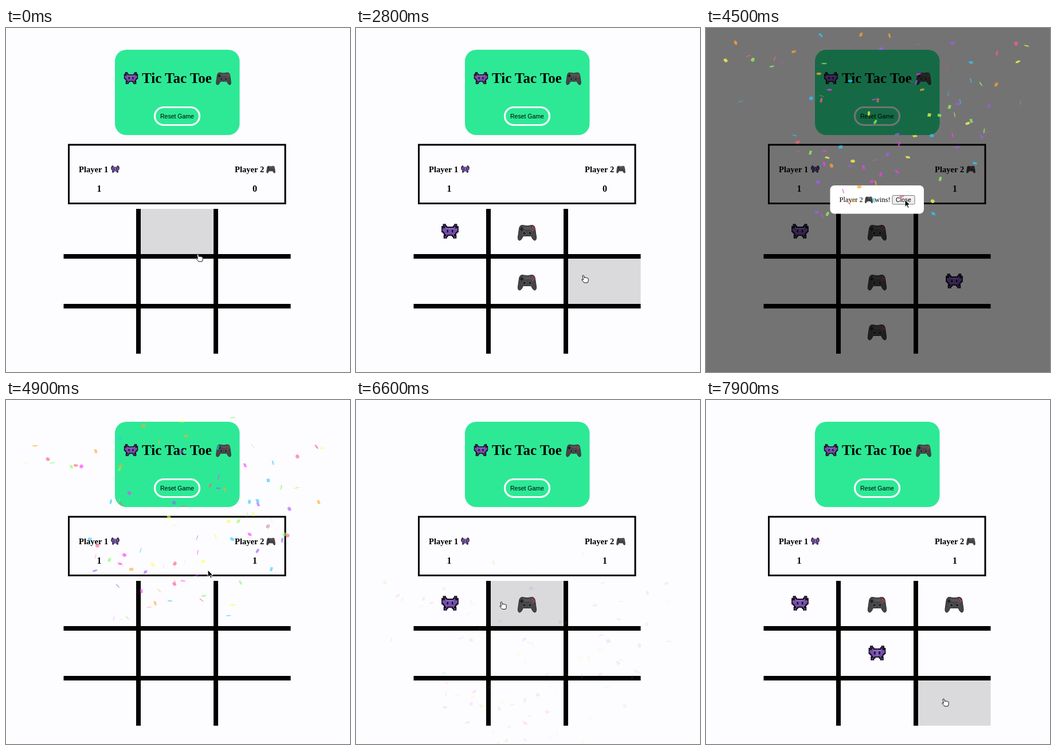
An HTML page with a canvas for the animation above (8000 ms loop, 600x601 px).

```html
<!DOCTYPE html>
<html lang="en">
<head>
<meta charset="utf-8">
<title>Tic Tac Toe</title>
<style>
  html, body { margin: 0; width: 600px; height: 601px; overflow: hidden; background: #fdfcfe; }
  svg, canvas { position: absolute; left: 0; top: 0; }
  .serif { font-family: "Liberation Serif", "Times New Roman", serif; }
  .bold { font-weight: bold; }
  .sans { font-family: "Liberation Sans", Arial, sans-serif; font-size: 10.5px; text-anchor: middle; }
</style>
</head>
<body>
<svg width="600" height="601">
  <defs>
    <g id="half">
      <path d="M0 3H3V2H4V.6H5.8V2H5V3.5H6V2.5H7V7H6V8H5V9.5H4V10.5H5.2V12.4H3V11H2V10H0" fill="#7650ad" stroke="#17101f" stroke-width=".9"/>
      <path d="M0 4H3.5V5H0Z" fill="#8c66c4"/>
      <path d="M1.5 5.2H2.7V7.6H1.5Z" fill="#140d1c"/>
    </g>
    <g id="alien" transform="scale(2) translate(0 -6.5)">
      <use href="#half"/><use href="#half" transform="scale(-1 1)"/>
    </g>
    <g id="pad">
      <path d="M-8-12.5Q-13-13-14-6L-16 8Q-16.500 14.500-12.500 14Q-9.500 13-7 6.500H7Q9.500 13 12.500 14Q16.500 14.500 16 8L14-6Q13-13 8-12.500Q0-10-8-12.500Z" fill="#454446" stroke="#2c2b2d"/>
      <path d="M-7-10.500Q0-8 7-10.500L5-5H-5Z" fill="#565558"/>
      <g fill="#252426" stroke="#777679" stroke-width=".8">
        <circle cx="-5" cy="1.500" r="3"/><circle cx="5" cy="1.500" r="3"/>
      </g>
      <path d="M-9.500-8.500V-2.500M-12.500-5.500H-6.500" stroke="#1d1c1e" stroke-width="2"/>
      <g fill="#d0424b">
        <circle cx="9.500" cy="-8.500" r="1.400"/><circle cx="12" cy="-5.800" r="1.400"/>
        <circle cx="7" cy="-5.800" r="1.200" fill="#8b5560"/><circle cx="9.500" cy="-3.200" r="1.200" fill="#a85555"/>
      </g>
    </g>
  </defs>

  <rect width="600" height="601" fill="#fdfcfe"/>
  <rect x="190" y="38" width="217.500" height="149" rx="20" fill="#2de996"/>
  <use href="#alien" transform="translate(218 87.500) scale(.82)"/>
  <text class="serif bold" x="237" y="96" font-size="25">Tic Tac Toe</text>
  <use href="#pad" transform="translate(379.500 88) scale(.8)"/>
  <rect x="259.500" y="138.500" width="78" height="31" rx="15.500" fill="none" stroke="#fdfcfe" stroke-width="3.200"/>
  <text class="sans" x="298.500" y="157.500">Reset Game</text>

  <rect x="109.500" y="204" width="377.500" height="102.500" fill="none" stroke="#000" stroke-width="3"/>
  <g class="serif bold" font-size="14.600">
    <text x="127" y="251.500">Player 1</text>
    <text x="399" y="251.500">Player 2</text>
  </g>
  <use href="#alien" transform="translate(190.500 246.500) scale(.48)"/>
  <use href="#pad" transform="translate(462 247) scale(.47)"/>
  <g class="serif bold" font-size="16" text-anchor="middle">
    <text x="162.500" y="285.500">1</text>
    <text id="score" x="434" y="285.500">0</text>
  </g>

  <rect id="hover" width="127" height="79" fill="#dad9db"/>
  <path d="M231 316V569M366 316V569M100.500 399H496.500M100.500 486H496.500" stroke="#000" stroke-width="8"/>
  <g id="marks"></g>

  <g id="modal">
    <rect width="600" height="601" fill="#000" fill-opacity=".54"/>
    <rect x="216.500" y="275" width="163.500" height="49.500" rx="7.500" fill="#fff"/>
    <g class="serif" font-size="12.500">
      <text x="232.500" y="304">Player 2</text><text x="294" y="304">wins!</text>
    </g>
    <use href="#pad" transform="translate(284 300) scale(.42)"/>
    <rect x="325" y="292.500" width="39" height="15.500" rx="2" fill="#efefef" stroke="#767676"/>
    <text class="sans" x="344.500" y="304">Close</text>
  </g>
</svg>
<canvas id="confetti" width="600" height="601"></canvas>
<svg width="600" height="601">
  <g id="cursor" stroke-linejoin="round">
    <path id="hand" d="M-1 1Q0-1 1.500 .8L2.500 5L3 4Q4.500 3.300 5 4.500Q6.500 3.600 7.200 5Q9 4.400 9.200 6.500Q9.800 10 8 13H2L-1.500 9Q-3 7-1.500 6.800L.5 8Z" fill="#fff" stroke="#111"/>
    <path id="arrow" d="M0 0V12.500L3 9.800L5 14.500L7 13.600L5 9H9Z" fill="#000" stroke="#fff"/>
  </g>
</svg>
<script>
const LOOP = 8000, STEP = 100, WIN = 3600, CLOSE = 4700, BURST = 3633;
const $ = id => document.getElementById(id);
const show = (el, on) => el.setAttribute('visibility', on ? 'visible' : 'hidden');

// time, x, y of the pointer tip
const path = [
  [0, 334, 395], [500, 300, 440], [1000, 301, 442], [1400, 198, 373], [1600, 198, 373],
  [2100, 292, 362], [2400, 294, 363], [2800, 396, 432], [3000, 428, 441], [3200, 424, 444],
  [3500, 294, 511], [4000, 294, 511], [4500, 347, 300], [4900, 352, 297], [5200, 340, 306],
  [5700, 172, 350], [6200, 176, 352], [6500, 252, 352], [6700, 254, 353], [7100, 300, 432],
  [7200, 302, 432], [7500, 410, 366], [7700, 414, 376], [7900, 414, 522], [8000, 414, 522]
];

// mark, cell, time placed, time cleared
const moves = [
  ['pad', 4, 700, CLOSE], ['alien', 0, 1400, CLOSE], ['pad', 1, 2100, CLOSE],
  ['alien', 5, 3000, CLOSE], ['pad', 7, WIN, CLOSE],
  ['alien', 0, 5800, LOOP], ['pad', 1, 6500, LOOP], ['alien', 4, 7100, LOOP], ['pad', 2, 7500, LOOP]
].map(([kind, cell, from, to]) => {
  const el = document.createElementNS('http://www.w3.org/2000/svg', 'use');
  const x = 164 + cell % 3 * 134.5, y = (kind === 'pad' ? 357 : 355) + Math.floor(cell / 3) * 87;
  el.setAttribute('href', '#' + kind);
  el.setAttribute('transform', `translate(${x} ${y})`);
  $('marks').append(el);
  return { el, from, to };
});

function pointer(t) {
  const i = path.findIndex(p => p[0] > t);
  const [t0, x0, y0] = path[i - 1], [t1, x1, y1] = path[i];
  const k = (1 - Math.cos(Math.PI * (t - t0) / (t1 - t0))) / 2;
  return [x0 + (x1 - x0) * k, y0 + (y1 - y0) * k];
}

function cellAt(x, y) {
  const col = Math.floor((x - 100.5) / 134.5), row = Math.floor((y - 316) / 87);
  const left = 100.5 + col * 134.5, top = 316 + row * 87;
  const inside = col >= 0 && col < 3 && row >= 0 && row < 3 && x - left <= 127 && y - top <= 79;
  return inside ? [left, top] : null;
}

let seed = 20;
function random() {
  seed = (seed + 0x6D2B79F5) | 0;
  let r = Math.imul(seed ^ seed >>> 15, 1 | seed);
  r = r + Math.imul(r ^ r >>> 7, 61 | r) ^ r;
  return ((r ^ r >>> 14) >>> 0) / 4294967296;
}

const colors = ['#26ccff', '#a25afd', '#ff5e7e', '#88ff5a', '#fcff42', '#ffa62d', '#ff36ff'];
const bits = Array.from({ length: 100 }, (_, i) => ({
  color: colors[i % 7],
  angle: (random() - .5) * 70 * Math.PI / 180 - Math.PI / 2,
  speed: 45 * (.5 + random()),
  wobble: random() * 10,
  spin: Math.min(.11, random() * .1 + .05),
  tilt: (random() * .5 + .25) * Math.PI,
  round: random() < .5
}));

const ctx = $('confetti').getContext('2d');
function drawConfetti(t) {
  ctx.setTransform(1, 0, 0, 1, 0, 0);
  ctx.clearRect(0, 0, 600, 601);
  const n = (t - BURST) * .06;
  if (n < 0 || n >= 200) return;
  ctx.setTransform(.78, 0, 0, .78, 300, 361);
  ctx.globalAlpha = 1 - n / 200;
  for (const b of bits) {
    const dist = b.speed * (1 - .9 ** n) * 10;
    const x = Math.cos(b.angle) * dist, y = Math.sin(b.angle) * dist + 3 * n;
    const w = b.wobble + b.spin * n, tilt = b.tilt + .1 * n;
    const dx = 10 * Math.cos(w), dy = 10 * Math.sin(w);
    const tx = 2.5 * Math.cos(tilt), ty = 2.5 * Math.sin(tilt);
    ctx.fillStyle = b.color;
    ctx.beginPath();
    if (b.round) {
      ctx.ellipse(x, y, Math.abs(dx) * .6, Math.abs(dy) * .6, Math.PI / 10 * w, 0, 2 * Math.PI);
    } else {
      ctx.moveTo(x, y);
      ctx.lineTo(x + dx, y + ty);
      ctx.lineTo(x + dx + tx, y + dy + ty);
      ctx.lineTo(x + tx, y + dy);
    }
    ctx.fill();
  }
}

function render(t) {
  const modal = t >= WIN && t < CLOSE;
  const [x, y] = pointer(t);
  const cell = modal ? null : cellAt(x, y);
  show($('modal'), modal);
  show($('hover'), cell);
  show($('hand'), cell);
  show($('arrow'), !cell);
  if (cell) {
    $('hover').setAttribute('x', cell[0]);
    $('hover').setAttribute('y', cell[1]);
  }
  $('cursor').setAttribute('transform', `translate(${x} ${y})`);
  $('score').textContent = t < WIN ? '0' : '1';
  for (const m of moves) show(m.el, t >= m.from && t < m.to);
  drawConfetti(t);
}

const start = performance.now();
function tick() {
  const t = (performance.now() - start) % LOOP;
  render(Math.floor(t / STEP) * STEP);
  requestAnimationFrame(tick);
}
tick();
</script>
</body>
</html>
```
